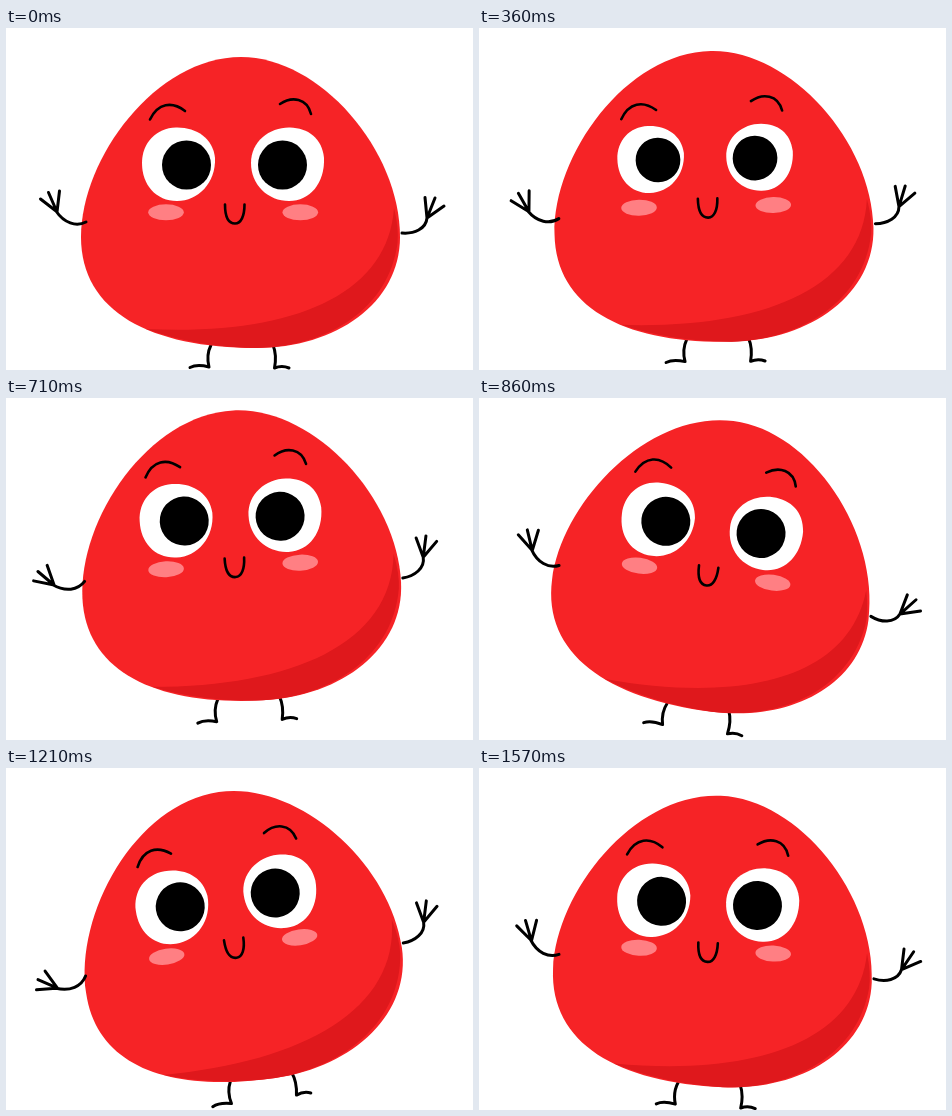
Write an HTML page that moves like this. It is 467 by 342 pixels and loops after 1.64 s.

```html
<!DOCTYPE html>
<html lang="en">
<head>
<meta charset="utf-8">
<title>Hopping blob</title>
<style>
  html, body { margin: 0; width: 100%; height: 100%; overflow: hidden; background: #fff; }
  svg { display: block; width: 100%; height: 100%; }
  .line { fill: none; stroke: #000; stroke-width: 3; stroke-linecap: round; stroke-linejoin: round; }
  .thin { stroke-width: 2.6; }
</style>
</head>
<body>
<svg viewBox="0 0 467 342">
  <g id="blob">
    <path class="line" d="M205 317Q200 327 203 339Q191 336 184 339.500M267 317Q271 327 268.500 340Q276 337 283 340"/>
    <path fill="#f62326" d="M235 29C314 29 394 122 394 209C394 275 330 320 250 320C145 320 75 284 75 209C75 130 150 29 235 29Z"/>
    <path fill="#df181c" d="M388 180C382 270 280 308 140 301Q190 319 250 320C323 319 383 280 391.500 215Q393 200 388 180Z"/>
    <g fill="#ff7f83">
      <ellipse cx="160" cy="184.300" rx="17.800" ry="8"/>
      <ellipse cx="294.300" cy="184.300" rx="17.800" ry="8"/>
    </g>
    <g id="leftEye">
      <path fill="#fff" d="M170 99.500C190 99 207 110 209 130C210 155 192 173 171 173C150 173 136 157 136 135C136 115 150 100 170 99.500Z"/>
      <circle cx="180.500" cy="137" r="24.500"/>
    </g>
    <g id="rightEye">
      <path fill="#fff" d="M284 99.500C264 99 245 113 245 135C245 157 262 173 283 173C304 173 319 155 318 130C316 110 302 100 284 99.500Z"/>
      <circle cx="276.500" cy="137" r="24.500"/>
    </g>
    <path id="brows" class="line thin" d="M144 91.500C152 75 166 73 179 83M274 76C286 68 301 70 305 86"/>
    <path class="line thin" d="M219 176.500C219 188 222 195.500 229 195.500C235 195.500 238.500 188 238.500 176.500"/>
    <path id="leftArm" class="line" d="M80 194C70 199 58 195 50 183L34.500 171M42.500 164.500L51 184L53.500 163"/>
    <path id="rightArm" class="line" d="M396 205C408 206 420 201 421 190L438 178M419 169.500L421 190L429 170"/>
  </g>
</svg>
<script>
const LOOP = 1640, FPS = 14, LAST_STEP = 22;

// Turning points of the sway: step, then degrees of body, left arm, right arm
const turns = [
  [4, 0, 0, 0],
  [8.2, -8.5, -38, -29],
  [12.8, 8.5, 6, 23],
  [16.7, -8.5, -35, -7],
  [20.6, 8.5, 16, 34],
  [22.8, 0, 0, 0],
];

const clamp = (v, lo, hi) => Math.min(hi, Math.max(lo, v));
const easeInOut = u => (1 - Math.cos(Math.PI * clamp(u, 0, 1))) / 2;
const set = (id, transform) => document.getElementById(id).setAttribute('transform', transform);
const scaleAt = (x, y, s) => `translate(${x} ${y}) scale(${s}) translate(${-x} ${-y})`;

function poseAt(step) {
  const next = Math.max(1, turns.findIndex(turn => turn[0] > step));
  const [from, ...a] = turns[next - 1];
  const [to, ...b] = turns[next];
  const k = easeInOut((step - from) / (to - from));
  return a.map((angle, i) => angle + (b[i] - angle) * k);
}

function draw(now) {
  const step = Math.min(LAST_STEP, Math.floor((now % LOOP + 4.4) * FPS / 1000));
  const [tilt, leftWave, rightWave] = poseAt(step);

  // Each hop is highest when the body is upright
  const lift = clamp(Math.min((step - 4) / 3, (22.2 - step) / 2), 0, 1);
  const hop = -lift * (17.8 - 0.183 * tilt * tilt);
  set('blob', `translate(0 ${hop}) rotate(${tilt} 227 184)`);
  set('leftArm', `rotate(${leftWave} 75 198)`);
  set('rightArm', `rotate(${rightWave} 395 205)`);

  const squint = Math.sin(Math.PI * Math.min(step / 6, 1)) ** 2;
  const eye = 1 - 0.35 * squint;
  set('leftEye', scaleAt(174, 136, eye));
  set('rightEye', scaleAt(282, 136, eye));
  set('brows', `translate(0 ${15.5 * squint})`);
}

const start = performance.now();
function tick() {
  draw(performance.now() - start);
  requestAnimationFrame(tick);
}
tick();
</script>
</body>
</html>
```
